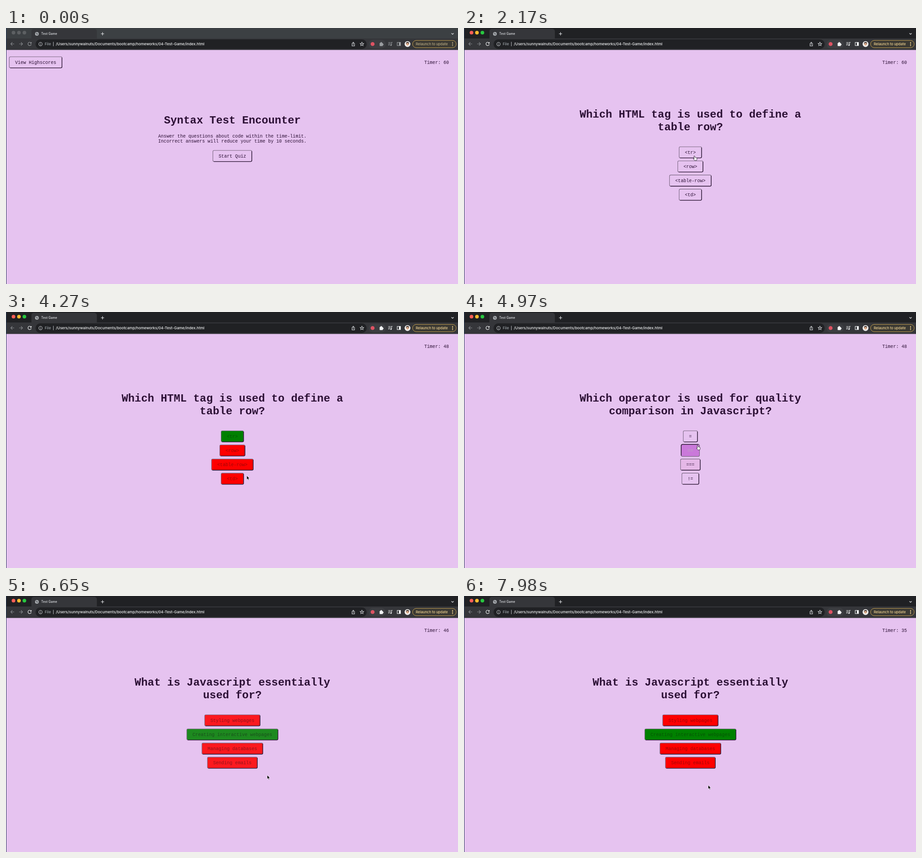
Recreate the animation shown at these times as an HTML page. Size 995x563 px, loop 8 s.

```html
<!DOCTYPE html>
<html lang="en">
<head>
<meta charset="utf-8">
<title>Test Game</title>
<style>
  html, body { margin: 0; width: 100%; height: 100%; overflow: hidden; background: #e6c3f0; }
  svg { display: block; width: 100vw; height: 100vh; }
  .ui { font-family: Inter, Roboto, sans-serif; font-weight: 500; }
  .mono { font: 10.08px "Liberation Mono", "Courier New", monospace; fill: #2c1035; }
  .big { font-size: 23.92px; font-weight: bold; }
  .mid { text-anchor: middle; }
  .icon { fill: none; stroke-width: 1.1; }
</style>
</head>
<body>
<svg viewBox="0 0 995 563" preserveAspectRatio="none">
  <rect width="995" height="563" fill="#e6c3f0"/>
  <g class="ui">
    <rect id="strip" width="995" height="24"/>
    <rect x="56" y="2" width="144" height="28" rx="5" fill="#35363a"/>
    <rect y="23" width="995" height="25.3" fill="#35363a"/>
    <g id="lights"></g>
    <circle cx="68" cy="12.9" r="4.1" fill="#a9adb1"/>
    <path d="M65.300 11.200l3 .6 1 2-2 .7" class="icon" stroke="#45474b"/>
    <text x="77.5" y="15.3" font-size="6.9" fill="#dfe1e5">Test Game</text>
    <g class="icon" stroke="#e8eaed">
      <path id="plus" d="M-3.500 0h7M0-3.500v7" transform="translate(212.500 12.800)"/>
      <use href="#plus" transform="translate(180.700 -146.500) rotate(45) scale(.9)"/>
      <path d="M980.500 11.500l2.500 2.500 2.500-2.500"/>
    </g>
    <g class="icon" stroke="#85888c">
      <path id="back" d="M18 35h-7.500M14 31.500L10.500 35l3.500 3.500"/>
      <use href="#back" transform="translate(47 0) scale(-1 1)"/>
    </g>
    <path d="M55 32.700A3.700 3.700 0 1 0 55.600 36M55.700 31v2.600h-2.600" class="icon live"/>
    <rect x="65" y="25" width="729" height="21" rx="10.5" fill="#202124"/>
    <g class="icon" stroke="#b5b8bc">
      <circle cx="76" cy="35.3" r="3.8"/>
      <path d="M76 34.800v2.400M76 32.900v1M104.300 30.500v9.500"/>
    </g>
    <text x="85.2" y="38.3" font-size="8.2" fill="#9aa0a6">File</text>
    <text x="109.8" y="38.3" font-size="8.22" fill="#f1f3f4">/Users/sunnywalnuts/Documents/bootcamp/homeworks/04-Test-Game/index.html</text>
    <g class="icon" stroke="#c8cbce">
      <path d="M763 34h-1.300v5.400h5.600V34H766M764.500 37v-5.500M762.800 33l1.700-1.800 1.700 1.800"/>
      <path id="star"/>
    </g>
    <rect x="798" y="26" width="38" height="19" rx="9.5" fill="#3c3d41"/>
    <circle cx="807" cy="35.3" r="4.3" fill="#dd5363"/>
    <g class="solid">
      <rect x="822.5" y="32.7" width="7" height="7" rx=".8"/>
      <circle cx="826" cy="32.4" r="1.6"/><circle cx="829.5" cy="36.2" r="1.6"/>
      <circle cx="847.5" cy="37.7" r="1.5"/>
      <rect x="865" y="31.7" width="3.5" height="7"/>
    </g>
    <g class="icon live">
      <path d="M841.500 32h5.500M841.500 34.700h5.500M841.500 37.400h3.200M848.700 37.500v-6h2"/>
      <rect x="861.2" y="31.7" width="7.3" height="7"/>
    </g>
    <circle cx="883.9" cy="35.3" r="6.4" fill="#f2f0ee"/>
    <circle cx="883.9" cy="34" r="3.3" fill="#352b29"/>
    <circle cx="883.9" cy="35.6" r="2.9" fill="#d9a988"/>
    <rect x="895" y="27.3" width="96" height="16" rx="8" fill="#3b3933" stroke="#d5ac52" stroke-width=".9"/>
    <g id="update">
      <text x="902" y="38.2" font-size="7.65">Relaunch to update</text>
      <path d="M982 31h2v2h-2zm0 3.300h2v2h-2zm0 3.300h2v2h-2z"/>
    </g>
  </g>
  <rect width="1" height="563" fill="#263b58"/>
  <text id="timer" class="mono" x="920.7" y="79"></text>
  <g id="intro">
    <text class="mono big mid" x="498.3" y="210.3">Syntax Test Encounter</text>
    <text class="mono mid" x="498.3" y="240.6">Answer the questions about code within the time-limit.</text>
    <text class="mono mid" x="498.3" y="251.8">Incorrect answers will reduce your time by 10 seconds.</text>
  </g>
  <g id="quiz">
    <text id="line1" class="mono big mid" x="498.3" y="197.3"></text>
    <text id="line2" class="mono big mid" x="498.3" y="224.9"></text>
  </g>
  <g id="pointer" stroke-linejoin="round">
    <circle id="ring" cx="-.5" r="18" fill="none" stroke="#2c1035"/>
    <path id="arrow" d="M0 0V8.600L2 6.800 3.300 9.700 4.800 9 3.500 6.200H6.100Z" stroke="#fff" stroke-width=".7"/>
    <path id="hand" d="M0 1Q1-1 2 1L2.600 3.500 5.600 4.200Q7 4.200 6.900 7.300L6 10.300H1.800L-1.300 6.700Q-1.600 5.400 .8 6.500Z" fill="#fff" stroke="#1d1722" stroke-width=".8"/>
  </g>
</svg>
<script>
const LOOP = 8000, STEP = 70, FADE = 500, PRESS = 140, FEEDBACK = 1000, SECOND = 1030;
const ACTIVE = 1400, START = 2170, CENTER = 498.3;

const questions = [
  { click: 3400, pick: 1, key: 0, lines: ['Which HTML tag is used to define a', 'table row?'],
    answers: ['<tr>', '<row>', '<table-row>', '<td>'] },
  { click: 5590, pick: 1, key: 1, lines: ['Which operator is used for quality', 'comparison in Javascript?'],
    answers: ['=', '==', '===', '!='] },
  { click: 7180, pick: 2, key: 1, lines: ['What is Javascript essentially', 'used for?'],
    answers: ['Styling webpages', 'Creating interactive webpages', 'Managing databases', 'Sending emails'] }
];
questions.forEach((q, i) => q.ask = i ? questions[i - 1].click + FEEDBACK : START);
const clicks = [ACTIVE, START, ...questions.map(q => q.click)];

// pointer stops: arrive, leave, x, y
const stops = [
  [70, 70, 890, 527], [280, 770, 527, 418], [1120, 1190, 496, 316], [1330, 3010, 506, 281],
  [3290, 3430, 502, 311], [3780, 4550, 530, 360], [4770, 4770, 512, 318],
  [4970, 5600, 513, 293], [6300, 6650, 575, 394], [6930, 7255, 524, 341], [7420, LOOP, 537.5, 416]
];

// fill rgb, then text rgba with premultiplied alpha
const looks = {
  base: [230, 195, 240, 44, 16, 53, 1],
  hover: [186, 85, 211, 255, 255, 255, 1],
  right: [0, 128, 0, 6, 6, 6, .4],
  wrong: [255, 0, 0, 6, 6, 6, .4]
};

const $ = id => document.getElementById(id);
const show = (node, on) => node.setAttribute('visibility', on ? 'visible' : 'hidden');
const mix = (a, b, k) => a.map((v, i) => v + (b[i] - v) * k);
const questionAt = t => questions.findLast(q => q.ask <= t) || questions[0];
const halfWidth = label => label.length * 3.025 + 12.6;

// cubic-bezier(.25, .1, .25, 1)
function ease(x) {
  if (x >= 1) return 1;
  let lo = 0, hi = 1, u = .5;
  for (let i = 0; i < 18; i++) {
    u = (lo + hi) / 2;
    if (.75 * u * (1 - u) + u ** 3 < x) lo = u; else hi = u;
  }
  return .3 * u * (1 - u) ** 2 + 3 * u * u * (1 - u) + u ** 3;
}

function pointerAt(t) {
  const i = Math.max(0, stops.findLastIndex(s => s[0] <= t));
  const [, leave, ...here] = stops[i];
  const [arrive, , ...next] = stops[i + 1] || stops[i];
  return t <= leave ? here : mix(here, next, (t - leave) / (arrive - leave));
}

function add(parent, tag, attrs = {}) {
  const node = document.createElementNS('http://www.w3.org/2000/svg', tag);
  set(node, attrs);
  return parent.appendChild(node);
}
function set(node, attrs) {
  for (const key in attrs) node.setAttribute(key, attrs[key]);
}

function makeButton(parent, x, y) {
  const g = add(parent, 'g');
  const box = add(g, 'rect', { y: -12.2, height: 24.4, rx: 2.6, stroke: '#7b6883', 'stroke-width': 1.1 });
  const edge = add(g, 'path', { fill: 'none', stroke: '#2c1535', 'stroke-width': 1.3 });
  const text = add(g, 'text', { class: 'mono mid', y: 3.2 });
  return (label, look = looks.base, hot = false) => {
    const half = halfWidth(label), alpha = look[6];
    const ink = look.slice(3, 6).map(v => v / alpha);
    set(g, { transform: `translate(${x} ${y}) scale(${hot ? 1.08 : 1})` });
    set(box, { x: -half, width: half * 2, fill: `rgb(${look.slice(0, 3)})` });
    set(edge, {
      d: `M${half} -10.5V9.6Q${half} 12.2 ${half - 2.6} 12.2H${2 - half}`,
      transform: `scale(${hot ? -1 : 1})`
    });
    text.textContent = label;
    text.style.fill = `rgba(${ink},${alpha})`;
  };
}

const rowY = i => 273.4 + i * 31.07;
makeButton($('intro'), 65.3, 75.4)('View Highscores');
const startButton = makeButton($('intro'), CENTER, 281.4);
const slots = questions[0].answers.map((_, i) => makeButton($('quiz'), CENTER, rowY(i)));

function isOver(label, y, t) {
  const [px, py] = pointerAt(t);
  return Math.abs(px - CENTER) < halfWidth(label) && Math.abs(py - y) < 12.7;
}
const startState = t => isOver('Start Quiz', 281.4, t) ? 'hover' : 'base';
function slotState(i, t) {
  if (t < START) return 'base';
  const q = questionAt(t);
  if (t >= q.click) return i === q.key ? 'right' : 'wrong';
  return isOver(q.answers[i], rowY(i), t) ? 'hover' : 'base';
}

// Walks the loop once and records each change of state with the look it fades from.
function record(stateAt) {
  const log = [{ at: -FADE, state: 'base', from: looks.base }];
  for (let t = 0; t < LOOP; t += 10) {
    const state = stateAt(t);
    if (state !== log.at(-1).state) log.push({ at: t, state, from: lookAt(log, t).look });
  }
  return log;
}
function lookAt(log, t) {
  const { at, state, from } = log.findLast(e => e.at <= t);
  return { look: mix(from, looks[state], ease((t - at) / FADE)), hot: state === 'hover' && t > at };
}
const startLog = record(startState);
const slotLogs = slots.map((_, i) => record(t => slotState(i, t)));

const lights = [0, 1, 2].map(i => add($('lights'), 'circle', { cx: 16.5 + i * 12, cy: 10.3, r: 4 }));
const starPoints = Array.from({ length: 10 }, (_, i) => {
  const r = i % 2 ? 1.9 : 4.2, a = i * Math.PI / 5;
  return [783.5 + r * Math.sin(a), 35.4 - r * Math.cos(a)];
});
set($('star'), { d: `M${starPoints.join('L')}Z` });

function drawChrome(active) {
  const ink = active ? '#f1f3f4' : '#9a9da1';
  const colors = ['#ff5f57', '#febc2e', '#28c840'];
  set($('strip'), { fill: active ? '#202124' : '#3c4043' });
  lights.forEach((light, i) => set(light, { fill: active ? colors[i] : '#5d6063' }));
  document.querySelectorAll('.live').forEach(n => set(n, { stroke: ink }));
  document.querySelectorAll('.solid').forEach(n => set(n, { fill: ink }));
  set($('update'), { fill: active ? '#f0d391' : '#b7a982' });
}

function drawPointer(t) {
  const hand = [startState, ...slots.map((_, i) => time => slotState(i, time))]
    .some((stateAt, i) => (i > 0) === (t >= START) && stateAt(t) === 'hover');
  set($('pointer'), { transform: `translate(${pointerAt(t)})` });
  show($('arrow'), t >= stops[0][0] && !hand);
  show($('hand'), hand);
  show($('ring'), clicks.some(c => t >= c - PRESS && t < c));
}

function draw(t) {
  const q = questionAt(t);
  const misses = questions.filter(item => t >= item.click && item.pick !== item.key).length;
  const seconds = Math.max(0, Math.floor((t - START) / SECOND));
  drawChrome(t >= ACTIVE);
  $('timer').textContent = `Timer: ${60 - seconds - 10 * misses}`;
  show($('intro'), t < START);
  show($('quiz'), t >= START);
  $('line1').textContent = q.lines[0];
  $('line2').textContent = q.lines[1];
  const start = lookAt(startLog, t);
  startButton('Start Quiz', start.look, start.hot);
  slots.forEach((paint, i) => {
    const { look, hot } = lookAt(slotLogs[i], t);
    paint(q.answers[i], look, hot);
  });
  drawPointer(t);
}

const origin = performance.now();
function frame() {
  const t = (performance.now() - origin) % LOOP;
  draw(Math.floor(t / STEP) * STEP);
  requestAnimationFrame(frame);
}
frame();
</script>
</body>
</html>
```
